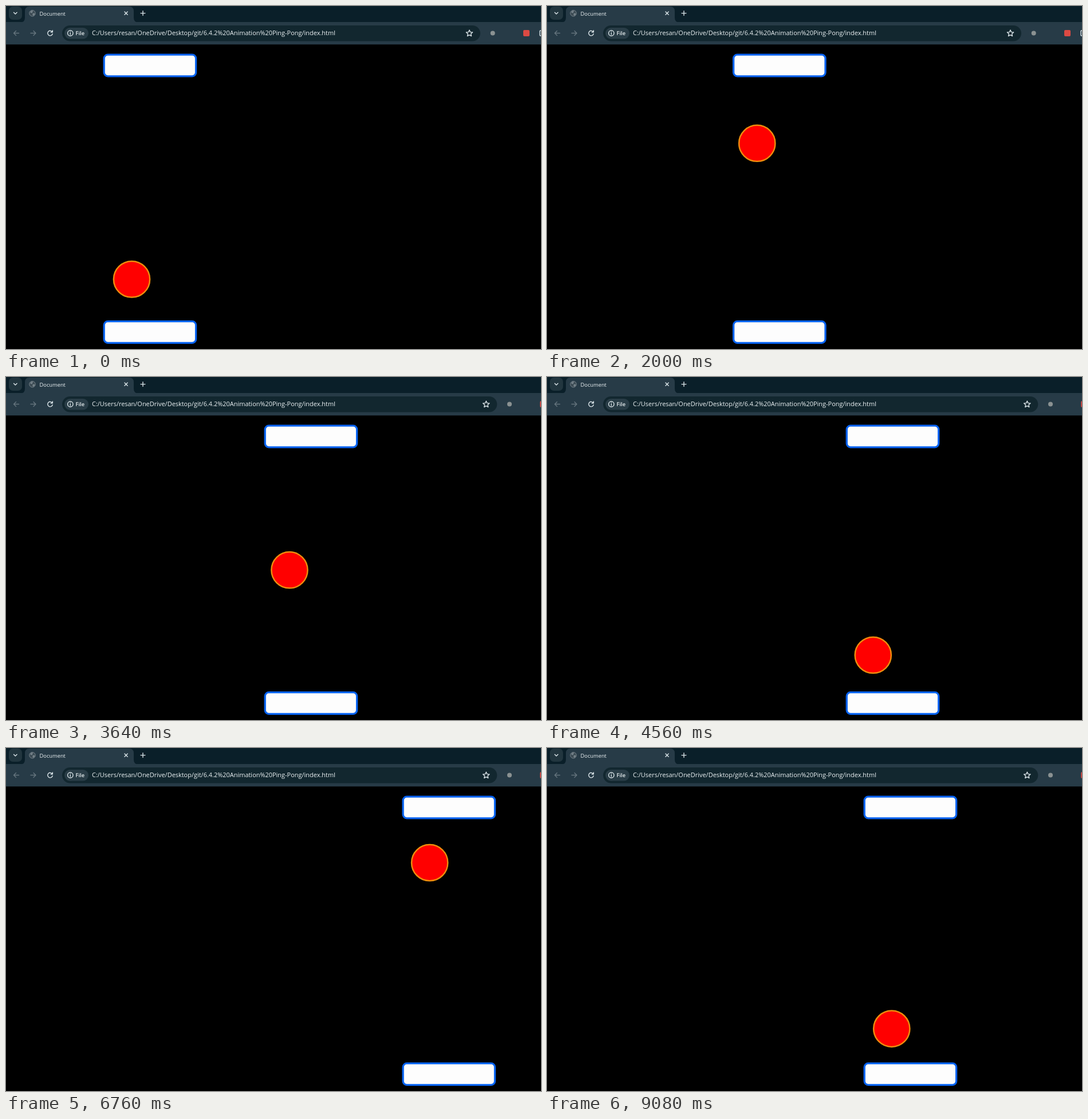
Write an HTML page that moves like this. It is 934 px wide and 600 px high and loops after 9.16 s.

```html
<!DOCTYPE html>
<html lang="en">
<head>
<meta charset="utf-8">
<title>Ping-Pong</title>
<style>
  html, body { margin: 0; width: 100%; height: 100%; overflow: hidden; background: #000; }
  svg { display: block; width: 934px; height: 600px; }
  text { font-family: "Open Sans", "Noto Sans", sans-serif; fill: #edf3f5; }
  .icon { fill: none; stroke: #dbe5e9; stroke-width: 1.4; stroke-linecap: round; stroke-linejoin: round; }
  .dim { stroke: #65757e; }
  .paddle { fill: #fdfdfd; stroke: #0763f2; stroke-width: 3.3; }
  .ball { fill: #f00; stroke: #ee8c0c; stroke-width: 2.5; }
</style>
</head>
<body>
<svg viewBox="0 0 934 600">
  <!-- Tab strip -->
  <rect width="934" height="30" fill="#0a1f29"/>
  <rect x="5" y="1" width="23" height="23" rx="7" fill="#22363f"/>
  <path class="icon" d="M13.5 11.2l2.8 2.8 2.8-2.8"/>
  <path d="M25 28.5q8 0 8-8V9q0-8 8-8h174q8 0 8 8v11.500q0 8 8 8z" fill="#273b47"/>
  <circle cx="46" cy="12.700" r="5.300" fill="#3c4b54" stroke="#76838a"/>
  <path d="M42 10.500l3-2.500 2 1-1 2.500-2 1zM46.500 13l3-.5 1 1.500-2 3-2-1z" fill="#76838a"/>
  <text x="58.500" y="16.500" font-size="9.300">Document</text>
  <path class="icon" d="M207 10l5.200 5.200m0-5.200l-5.200 5.200"/>
  <path class="icon" d="M235 12.600h8m-4-4v8"/>

  <!-- Toolbar -->
  <rect y="28" width="934" height="39.300" fill="#273b47"/>
  <path class="icon dim" d="M22.500 47.500h-9m4-4l-4 4 4 4"/>
  <path class="icon dim" d="M43 47.500h9m-4-4l4 4-4 4"/>
  <path class="icon" d="M80.800 45.500a4.300 4.300 0 1 0 .4 3.200M81.300 42.800v3h-3"/>
  <rect id="address" x="98" y="34" width="730" height="27.500" rx="13.750" fill="#12272f"/>
  <rect x="102" y="38" width="42" height="19.500" rx="9.750" fill="#293d47"/>
  <circle class="icon" cx="112.300" cy="47.500" r="4.700"/>
  <path class="icon" d="M112.300 47.300v2.500m0-4.700v.1"/>
  <text x="121.500" y="51" font-size="9.300" font-weight="600">File</text>
  <text x="150" y="51.300" font-size="10.960">C:/Users/resan/OneDrive/Desktop/git/6.4.2%20Animation%20Ping-Pong/index.html</text>
  <g id="actions">
    <path class="icon" d="M809 42l1.600 3.600 4 .4-3 2.700.9 3.900-3.500-2-3.500 2 .9-3.900-3-2.700 4-.4z"/>
    <circle cx="849.700" cy="47.500" r="4" fill="#8b9292"/>
    <rect x="903" y="42" width="11" height="11" rx="2" fill="#dc4a43"/>
    <rect class="icon" x="932" y="43" width="9" height="9" rx="1"/>
  </g>

  <!-- Game -->
  <g id="paddles">
    <rect class="paddle" x="1.200" y="85.200" width="160.400" height="37.600" rx="6.500"/>
    <rect class="paddle" x="1.200" y="551.700" width="160.400" height="37.600" rx="6.500"/>
  </g>
  <circle id="ball" class="ball" r="31.600"/>
</svg>
<script>
  const LOOP = 9160;
  const STEP = 40;
  const TOOLBAR_SHIFT_AT = 3640;
  const TOOLBAR_SHIFT = 29.3;

  // Each key is [time, ...position].
  const paddleKeys = [[0, 170], [7020, 712], [LOOP, 546.8]];
  const ballKeys = [
    [0, 219.5, 478],
    [261, 240.5, 520],
    [2520, 404.5, 156.5],
    [4767, 586, 520],
    [7020, 759.7, 159],
    [LOOP, 595.6, 504]
  ];

  const [address, actions, paddles, ball] =
    ["address", "actions", "paddles", "ball"].map(id => document.getElementById(id));

  function positionAt(keys, time) {
    const next = keys.findIndex(key => key[0] > time);
    const [t0, ...from] = keys[next - 1];
    const [t1, ...to] = keys[next];
    const progress = (time - t0) / (t1 - t0);
    return from.map((value, i) => value + (to[i] - value) * progress);
  }

  function move(node, x, y = 0) {
    node.setAttribute("transform", `translate(${x} ${y})`);
  }

  function draw() {
    const time = Math.floor((performance.now() % LOOP) / STEP) * STEP;
    const shift = time < TOOLBAR_SHIFT_AT ? 0 : TOOLBAR_SHIFT;
    move(paddles, ...positionAt(paddleKeys, time));
    move(ball, ...positionAt(ballKeys, time));
    move(actions, shift);
    address.setAttribute("width", 730 + shift);
    requestAnimationFrame(draw);
  }
  draw();
</script>
</body>
</html>
```
